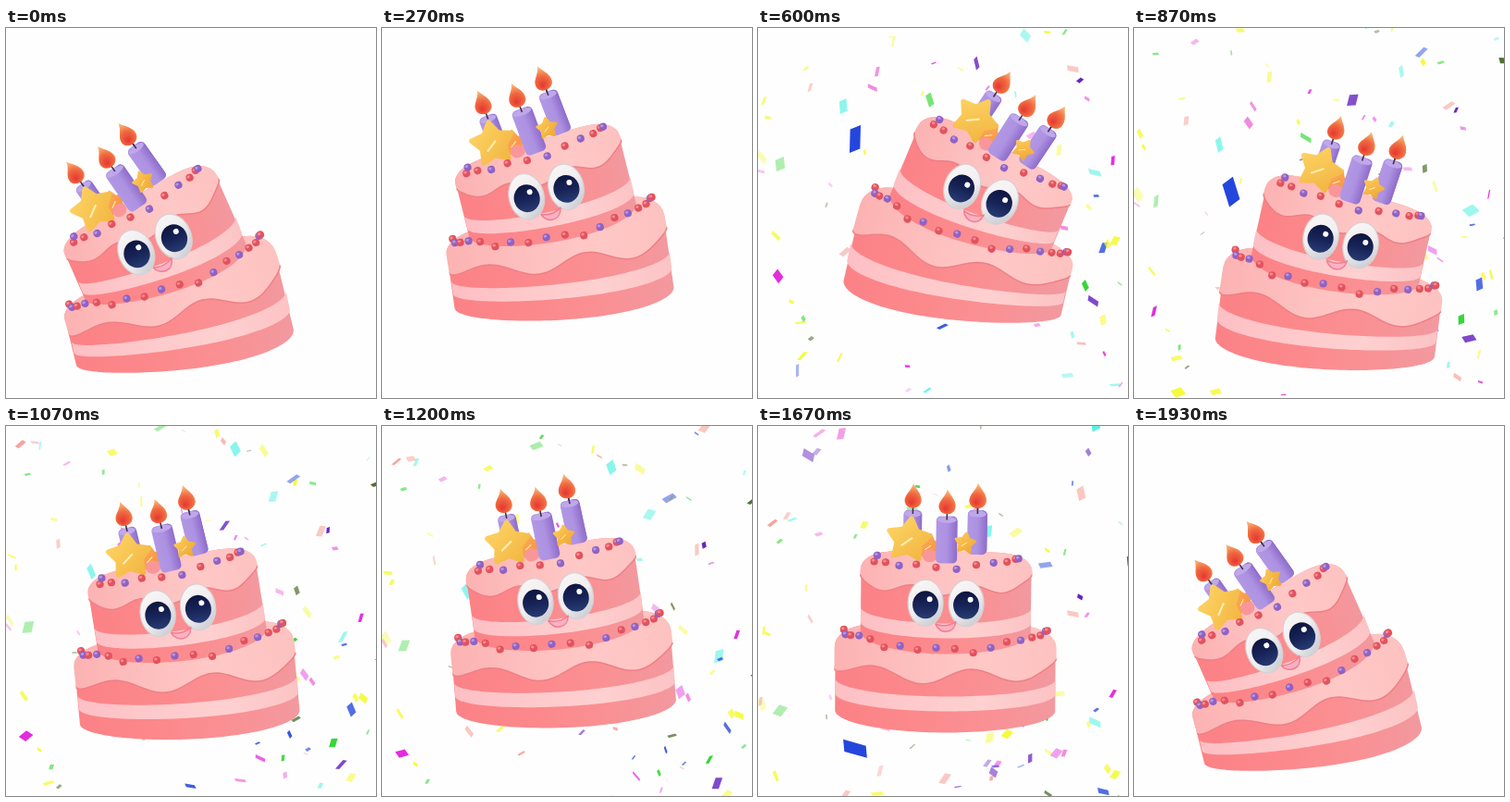
These frames come from a looping animation (400 by 400 pixels, 2 s). An HTML page with a canvas:

```html
<!DOCTYPE html>
<html lang="en">
<head>
<meta charset="utf-8">
<title>Bouncing birthday cake</title>
<style>
html, body { margin: 0; height: 100%; overflow: hidden; background: #fefefe; }
canvas { display: block; width: 100vmin; height: 100vmin; }
</style>
</head>
<body>
<canvas id="stage" width="400" height="400"></canvas>
<script>
const c = document.getElementById('stage').getContext('2d');
const { sin, cos, PI, abs, sqrt, min, max, floor } = Math;
const LOOP = 2000, STEP = 1000 / 15, RAD = PI / 180;
const clamp = v => min(1, max(0, v));

let seed = 7;
const rnd = () => (seed = seed * 16807 % 2147483647) / 2147483647;
const times = (n, make) => Array.from({ length: n }, (_, i) => make(i));

// Sideways lean as [step, value] keys
const LEAN = [[0, -1], [4, -.59], [9, .95], [13, .52], [17, -.5], [22, .76], [29, -1]];

// Smooth (Hermite) curve through the keys, resting at both ends
function track(keys, n) {
  const slope = i => keys[i - 1] && keys[i + 1]
    ? (keys[i + 1][1] - keys[i - 1][1]) / (keys[i + 1][0] - keys[i - 1][0]) : 0;
  let i = 0;
  while (i < keys.length - 2 && n > keys[i + 1][0]) i++;
  const [t0, a] = keys[i], [t1, b] = keys[i + 1], d = t1 - t0, p = (n - t0) / d;
  return a + (b - a) * p * p * (3 - 2 * p)
    + d * p * (1 - p) * (slope(i) * (1 - p) - slope(i + 1) * p);
}

// Two hops per loop, the second one lower
function hop(n) {
  const arc = (from, to, height) => height * 4 * (n - from) * (to - n) / (to - from) ** 2;
  return n < 13 ? arc(0, 13, 63) : arc(13, 29, 50);
}

// The cake lives in (u, h): offset from its axis and height; the axis is bent into an arc
const pose = { x: 0, y: 0, a: 0, k: 0 };
function warp(u, h) {
  const { x, y, a, k } = pose, r = a + k * h;
  return [x + (cos(a) - cos(r)) / k + u * cos(r), y - (sin(r) - sin(a)) / k + u * sin(r), r];
}

function at(u, h, draw) {
  const [x, y, r] = warp(u, h);
  c.save();
  c.translate(x, y);
  c.rotate(r);
  draw();
  c.restore();
}

function blend(x0, y0, x1, y1, colours) {
  const g = c.createLinearGradient(x0, y0, x1, y1);
  colours.forEach((s, i) => g.addColorStop(i / (colours.length - 1), s));
  return g;
}

// Area between two height functions across the width -w..w
function band(w, low, high, colours, edge) {
  const us = times(65, i => -w * cos(PI * i / 64));
  const [x0, y0] = warp(-w, low(0)), [x1, y1] = warp(w, low(0));
  const trace = (list, f) => list.forEach(u => {
    const [x, y] = warp(u, f(u));
    c.lineTo(x, y);
  });
  c.beginPath();
  trace(us, low);
  if (edge) {
    c.strokeStyle = edge;
    c.lineWidth = 3;
    c.stroke();
  }
  trace(us.reverse(), high);
  c.closePath();
  c.fillStyle = blend(x0, y0, x1, y1, colours);
  c.fill();
}

const dip = (w, side, depth) => u => side - depth * sqrt(max(0, 1 - (u / w) ** 2));
const dome = (w, side, rise) => u => side + rise * sqrt(max(0, 1 - (u / w) ** 6));
const wave = (w, side, depth, size, period, low) =>
  u => dip(w, side, depth)(u) - size * cos((u - low) * 2 * PI / period);

const SPONGE = ['#fb8286', '#fc888b', '#fa9093', '#f2999f'];
const CREAM = ['#fdbfc4', '#fec9cb', '#fed0d0', '#fcc3c4'];
const ICING = ['#fcb2b2', '#fdbfbe', '#fec8c6', '#fdc2c0'];

function layer(w, bottom, stripe, icing, top) {
  band(w, bottom, top, SPONGE);
  band(w, u => stripe(u) - 16, stripe, CREAM);
  band(w + 1, icing, top, ICING, '#ee8086');
}

function ellipse(x, y, rx, ry, fill, line) {
  c.beginPath();
  c.ellipse(x, y, rx, ry, 0, 0, 2 * PI);
  c.fillStyle = fill;
  c.fill();
  if (line) {
    c.strokeStyle = line;
    c.lineWidth = 1.2;
    c.stroke();
  }
}

function candle(u, h, w, len) {
  at(u, h, () => {
    c.fillStyle = blend(-w / 2, 0, w / 2, 0, ['#b197e4', '#ae92e2', '#8e6cca']);
    c.beginPath();
    c.roundRect(-w / 2, 0, w, len, 5);
    c.fill();
    ellipse(0, 4, w / 2 - 1, 3.5, '#bfa8ea');
    c.strokeStyle = '#453048';
    c.lineWidth = 1.6;
    c.beginPath();
    c.moveTo(0, 4);
    c.lineTo(0, -8);
    c.stroke();
    const glow = c.createRadialGradient(-2, -8, 1, 0, -13, 18);
    glow.addColorStop(0, '#e63c34');
    glow.addColorStop(.4, '#f0683f');
    glow.addColorStop(1, '#ffd890');
    c.fillStyle = glow;
    c.beginPath();
    c.moveTo(0, -29);
    c.bezierCurveTo(5, -20, 10, -17, 9, -9);
    c.bezierCurveTo(7, 0, -7, 0, -9, -9);
    c.bezierCurveTo(-10, -17, -2, -20, 0, -29);
    c.fill();
  });
}

function star(u, h, r, light, dark) {
  at(u, h, () => {
    c.rotate(.12);
    c.beginPath();
    for (let i = 0; i < 10; i++) {
      const q = i % 2 ? r * .52 : r * .92;
      c.lineTo(q * sin(i * PI / 5), -q * cos(i * PI / 5));
    }
    c.closePath();
    c.fillStyle = c.strokeStyle = blend(-r, -r, r, r, [light, dark]);
    c.lineWidth = r * .22;
    c.lineJoin = 'round';
    c.fill();
    c.stroke();
    c.strokeStyle = '#fff0b4';
    c.lineWidth = r * .08;
    c.beginPath();
    c.moveTo(-r * .3, r * .3);
    c.lineTo(r * .15, -r * .1);
    c.stroke();
  });
}

// A ring of sprinkles along the front rim, crowding towards both ends
const ring = (count, w, low, rise) => times(count, i => {
  const u = -cos(PI * i / (count - 1));
  return { u: u * w, h: low + rise * u * u + (rnd() - .5) * 8, red: i % 5 % 2 == 0 };
});
const sprinkles = [...ring(12, 78, 161, 10), ...ring(18, 110, 71, 20)];

function sprinkle({ u, h, red }) {
  at(u, h, () => {
    ellipse(0, 0, 4.1, 4.1, red ? '#e2525e' : '#8f62c4');
    ellipse(-1, -1.3, 1.8, 1.5, red ? '#f38a8e' : '#b795dc');
  });
}

function eye(u, h) {
  at(u, h + 2, () => ellipse(0, 0, 19, 25, blend(-15, -18, 15, 20, ['#f8f5f5', '#f0eef0', '#c9ccd2']), '#d8d0d2'));
  at(u, h, () => {
    ellipse(0, 0, 14, 15, blend(0, -14, 0, 14, ['#0f1640', '#172357', '#263a70']));
    ellipse(4.5, -6, 3, 3, '#fff');
  });
}

function mouth(u, h) {
  at(u, h, () => {
    c.rotate(-.06);
    c.beginPath();
    c.moveTo(-11, -2);
    c.quadraticCurveTo(0, 3, 11, -3);
    c.bezierCurveTo(9, 10, -7, 10, -11, -2);
    c.fillStyle = '#fbb0c4';
    c.fill();
    c.strokeStyle = '#ee7f90';
    c.lineWidth = 1.5;
    c.stroke();
  });
}

function cake(n) {
  const lean = track(LEAN, n);
  pose.x = 202 + 7.5 * lean;
  pose.y = 352 - hop(n);
  pose.a = 8.5 * RAD * lean;
  pose.k = .12 * RAD * lean || 1e-6;

  layer(119, dip(119, 7, 24), dip(119, 41, 19), wave(119, 58, 14, 8, 105, -25), dome(120, 74, 27));
  candle(-37, 223, 20, 42);
  candle(33, 224, 21, 48);
  layer(92, dip(92, 92, 24), dip(92, 118, 17), wave(92, 150, 13, 5, 66, 62), dome(93, 157, 22));
  candle(33, 224, 21, 48);
  star(-19, 184, 14, '#ffb45e', '#f58a3a');
  at(-18, 174, () => ellipse(0, 0, 8, 7, '#f9969a'));
  candle(0, 217, 23, 51);
  star(-41, 191, 25, '#ffd869', '#f0b03c');
  star(20, 188, 12, '#ffd05c', '#eda030');
  sprinkles.forEach(sprinkle);
  eye(-22, 121);
  eye(22, 121);
  mouth(0, 99);
}

const COLOURS = ['#f4fa30', '#e020dc', '#28d428', '#2446dc', '#48f0e0', '#f6a49c', '#f08ae0', '#6522c0', '#f4fa30', '#4a6a28'];

// Each piece has its place at 600 ms and falls faster the larger it is
const piece = (x, y, size, fill, alpha) => ({
  x, y, size, fill, alpha, v: .09 + size * .0083, thin: .3 + rnd() * .4,
  turn: rnd() * 6, spin: (rnd() - .5) * .007, flip: rnd() * 6
});
const confetti = times(150, i =>
  piece(rnd() * 420 - 10, rnd() * 580 - 180, 3 + 5 * rnd() ** 2, COLOURS[i % 10], .35 + .65 * rnd()));
confetti.push(piece(105, 120, 15, '#2446dc', 1));

function party(t) {
  if (t < 310 || t >= 1930) return;
  const burst = 1 - (1 - clamp((t - 300) / 290)) ** 3, fade = clamp((1930 - t) / 250);
  for (const p of confetti) {
    const d = t - 600, y = p.y + p.v * d;
    c.save();
    c.globalAlpha = p.alpha;
    c.translate(200 + (p.x - 200) * burst, 220 + (y - 220) * burst);
    c.rotate(p.turn + p.spin * d);
    c.transform(fade, 0, .3, fade * (.3 + .7 * abs(cos(p.flip + d * .006))), 0, 0);
    c.fillStyle = p.fill;
    c.fillRect(-p.size * .85, -p.size * p.thin, p.size * 1.7, p.size * p.thin * 2);
    c.restore();
  }
}

function frame(now) {
  const n = floor((now % LOOP + 4) / STEP) % 30;
  c.fillStyle = '#fefefe';
  c.fillRect(0, 0, 400, 400);
  party(n * STEP);
  cake(min(n, 29));
  requestAnimationFrame(frame);
}
frame(0);
</script>
</body>
</html>
```
